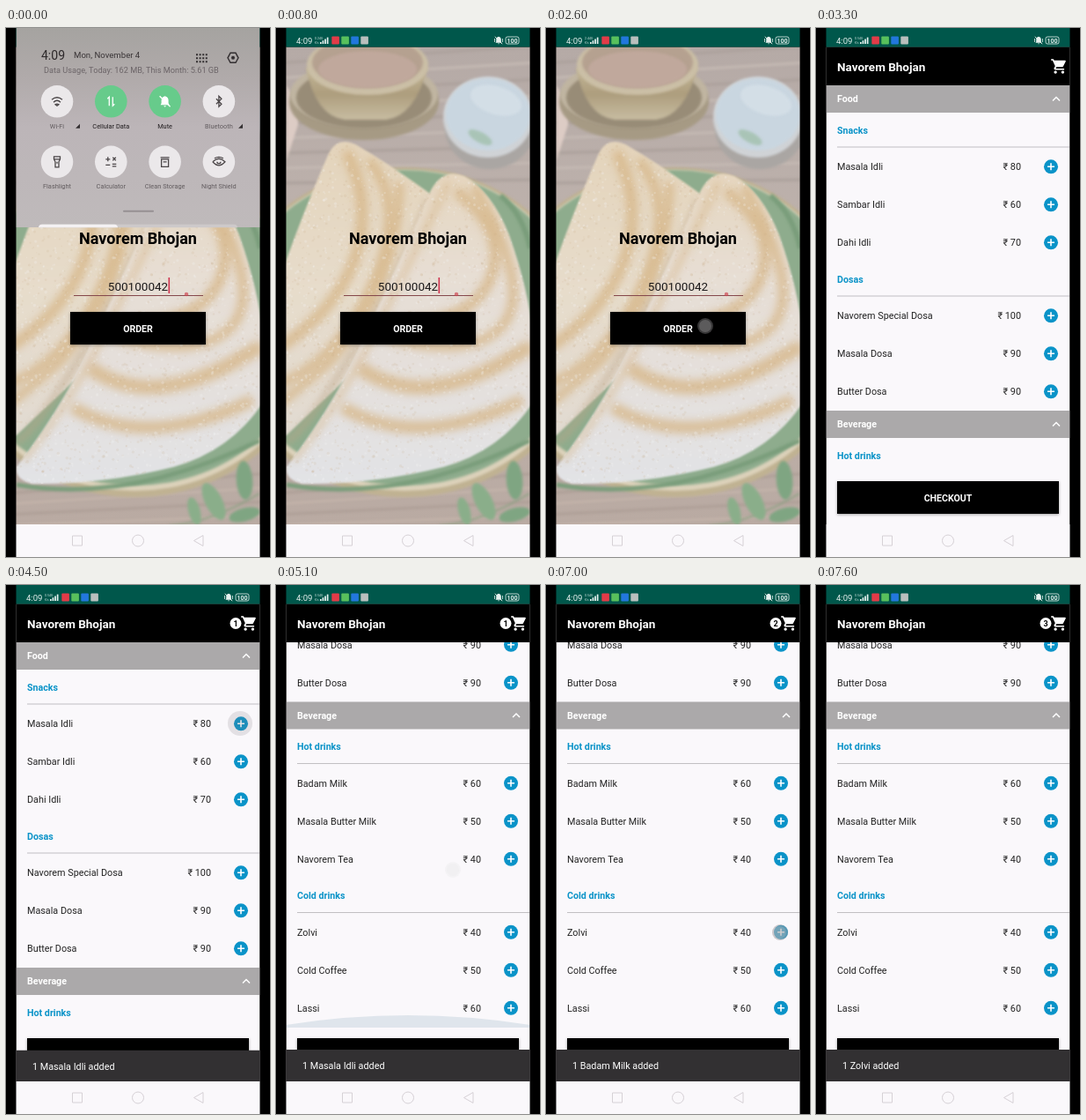
An HTML page with a canvas that plays this animation: 300x600 px, repeating every 8000 ms.

```html
<!DOCTYPE html>
<html>
<head>
<meta charset="utf-8">
<style>
  html, body { margin: 0; width: 100%; height: 100%; overflow: hidden; background: #000; }
  canvas { display: block; }
</style>
</head>
<body>
<canvas id="stage" width="300" height="600"></canvas>
<script>
const LOOP = 8000, LEFT = 11.5, WIDTH = 277, TOP = 21.5, SCROLL = 301.5;
const BLUE = '#0a93c8', PAPER = '#faf8fb', SHOP = 'Navorem Bhojan';
const MENU = [
  ['Food', [
    ['Snacks', [['Masala Idli', 80], ['Sambar Idli', 60], ['Dahi Idli', 70]]],
    ['Dosas', [['Navorem Special Dosa', 100], ['Masala Dosa', 90], ['Butter Dosa', 90]]]]],
  ['Beverage', [
    ['Hot drinks', [['Badam Milk', 60], ['Masala Butter Milk', 50], ['Navorem Tea', 40]]],
    ['Cold drinks', [['Zolvi', 40], ['Cold Coffee', 50], ['Lassi', 60]]]]]
];
const CART = new Path2D('M7 18a2 2 0 1 0 .01 0zM17 18a2 2 0 1 0 .01 0zM1 2v2h2l3.6 7.6-1.35 2.4C4.5 15.4 5.5 17 7 17h12v-2H7.4l1-1.9h7.5c.8 0 1.4-.4 1.7-1L21 5.5Q21.5 4 20 4H5.2l-.9-2z');

let ctx = document.getElementById('stage').getContext('2d');

const prog = (t, a, b) => Math.min(1, Math.max(0, (t - a) / (b - a)));
const ease = (t, a, b) => 1 - (1 - prog(t, a, b)) ** 3;

function rect(x, y, w, h, color, r = 0) {
  ctx.fillStyle = color;
  ctx.beginPath();
  ctx.roundRect(x, y, w, h, r);
  ctx.fill();
}
function oval(x, y, rx, ry, color, turn = 0) {
  ctx.fillStyle = color;
  ctx.beginPath();
  ctx.ellipse(x, y, rx, ry, turn, 0, 7);
  ctx.fill();
}
const disc = (x, y, r, color) => oval(x, y, r, r, color);
function line(d, color, width = 1) {
  ctx.strokeStyle = color;
  ctx.lineWidth = width;
  ctx.stroke(new Path2D(d));
}
function fill(d, color) {
  ctx.fillStyle = color;
  ctx.fill(new Path2D(d));
}
function text(s, x, y, size, color, weight = 400, align = 'left') {
  ctx.font = `${weight} ${size}px Roboto, sans-serif`;
  ctx.textAlign = align;
  ctx.fillStyle = color;
  ctx.fillText(s, x, y);
}
function clipped(x, y, w, h, draw) {
  ctx.save();
  ctx.beginPath();
  ctx.rect(x, y, w, h);
  ctx.clip();
  draw();
  ctx.restore();
}
function gradient(y0, y1, ...colors) {
  const g = ctx.createLinearGradient(0, y0, 0, y1);
  colors.forEach((c, i) => g.addColorStop(i / (colors.length - 1), c));
  return g;
}

function dosa(shape, base, bands, seed) {
  const next = () => (seed = seed * 16807 % 2147483647) / 2147483647;
  ctx.save();
  ctx.filter = 'blur(1px)';
  fill(shape, base);
  ctx.clip(new Path2D(shape));
  ctx.filter = 'blur(5px)';
  bands.forEach(([d, w]) => line(d, 'rgba(214,180,132,.75)', w));
  ctx.filter = 'none';
  for (let i = 0; i < 2600; i++) {
    disc(12 + next() * 276, 130 + next() * 390, .6 + next() * 1.2, i % 2 ? 'rgba(243,241,242,.25)' : 'rgba(190,155,115,.12)');
  }
  ctx.restore();
}

function makePhoto() {
  const canvas = document.createElement('canvas'), screen = ctx;
  canvas.width = 300;
  canvas.height = 600;
  ctx = canvas.getContext('2d');
  rect(0, 0, 300, 600, gradient(22, 563, '#b5aaa6', '#c0b4ae', '#b9aaa2'));
  ctx.filter = 'blur(1.5px)';
  for (let i = 0; i < 9; i++) line(`M0 ${40 + i * 17}L300 ${20 + i * 19}`, i % 2 ? '#c4b9b3' : '#aca19c', 3);
  for (let i = 0; i < 5; i++) line(`M0 ${528 + i * 12}L300 ${505 + i * 16}`, i % 2 ? '#c6b6ac' : '#aa9b93', 2);
  fill('M12 65Q28 90 25 110L12 150Z', '#ddccc5');
  // brass bowls
  oval(100, 84, 85, 43, '#a69a84');
  oval(100, 75, 84, 38, '#c0b5a1');
  oval(100, 79, 77, 35, '#988c77');
  fill('M34 45Q45 100 78 104H125Q158 100 172 45Z', gradient(45, 105, '#c3b798', '#ad9d7d', '#c8bda2'));
  oval(104, 42, 69, 34, '#cbbfa6');
  oval(104, 39, 63, 29, '#b5a190');
  oval(104, 47, 56, 21, '#c0a89c');
  // chutney
  oval(243, 113, 51, 47, '#aaa6a3');
  oval(241, 101, 51, 46, '#d0d3d6');
  oval(241, 98, 48, 41, '#c9d6e0');
  oval(250, 82, 30, 16, '#d3dee6', .3);
  oval(232, 124, 15, 6, '#a9c4b6', .5);
  // plate and leaf
  oval(146, 345, 208, 187, '#c0b292');
  oval(146, 343, 203, 182, '#dcd2bb');
  oval(146, 340, 199, 179, '#8eac8d');
  line('M12 518Q140 540 288 468', '#7a9d7b', 5);
  line('M255 190Q280 210 289 250', '#7a9d7b', 6);
  dosa('M0 296Q30 210 60 142Q70 122 92 133Q130 155 178 190L130 350L12 462H0Z',
    gradient(130, 460, '#e4d4bb', '#e7dccb', '#e2dbd2'), [
    ['M80 140Q110 200 90 260T0 365', 13],
    ['M105 150Q150 200 110 290T0 405', 11], ['M140 175Q140 290 60 380L0 430', 10]], 41);
  ctx.filter = 'blur(4px)';
  line('M174 195Q130 300 80 380T12 470', '#bda587', 4);
  ctx.filter = 'blur(1.5px)';
  dosa('M12 498Q75 415 105 340Q145 255 176 184Q190 158 214 168Q245 185 265 235Q288 300 292 350V425Q255 480 190 498Q110 518 30 517Q10 512 12 498Z',
    gradient(165, 515, '#e6d6bf', '#e7ded4', '#e5e0dc', '#e2e3e6'), [
    ['M196 175Q150 270 110 350T20 490', 5], ['M205 185Q262 230 245 280T150 335', 12],
    ['M225 180Q295 300 255 340T105 345', 11], ['M95 385Q170 440 290 360', 16],
    ['M75 430Q160 480 280 422', 14]], 97);
  // curry leaves
  line('M185 565Q235 560 288 528', '#8ea184', 2);
  [[236, 537, 23, 1.1], [271, 513, 22, 1.5], [214, 548, 16, 1.3], [271, 552, 18, -.25]]
    .forEach(([x, y, r, turn], i) => oval(x, y, r, r * .42, i % 2 ? '#7fa582' : '#8aae8a', turn));
  ctx = screen;
  return canvas;
}
const photo = makePhoto();

function statusBar(t) {
  rect(LEFT, 0, WIDTH, TOP, '#00574b');
  text('4:09', 23, 18, 9.5, '#e6f0ee');
  const rate = t < 900 ? '0.2' : t < 2000 ? '1.1' : t < 3300 ? '2.4' : '0.5';
  text(rate, 44, 13, 3.5, '#cfe0dc');
  text('K/s', 44, 17.5, 3, '#cfe0dc');
  text('4G', 49, 13, 3.5, '#cfe0dc');
  for (let i = 0; i < 4; i++) rect(50 + i * 2.6, 16 - i * 1.8, 1.7, 2 + i * 1.8, '#e6f0ee');
  ['#e23b48', '#58c05c', '#2277dd', '#b9bfbd'].forEach((c, i) => rect(63.3 + i * 11, 9.5, 8.6, 9, c, 1));
  bell(253, 14, .7, '#e6f0ee');
  line('M248.5 12v4M257.5 12v4', '#e6f0ee', .8);
  line('M263 10H274Q276 10 276 12V16Q276 18 274 18H263Q261 18 261 16V12Q261 10 263 10Z', '#e6f0ee', .8);
  text('100', 268.5, 16.8, 7, '#e6f0ee', 700, 'center');
}

function bell(x, y, scale, color) {
  ctx.save();
  ctx.translate(x, y);
  ctx.scale(scale, scale);
  fill('M-5 4L-4 2V-1Q-4 -5 0 -6Q4 -5 4 -1V2L5 4ZM-1.5 5H1.5L0 6.5Z', color);
  line('M-6 -6L6 6', color, 1.3);
  ctx.restore();
}

function navBar() {
  rect(LEFT, 563, WIDTH, 37, PAPER);
  line('M75.5 576H86.5V587H75.5ZM156.5 581.5A6.5 6.5 0 1 1 143.5 581.5A6.5 6.5 0 1 1 156.5 581.5M213.5 581.5L224 575.5V587.5Z', '#d6d1d6');
}

function button(label, x, y, w, h) {
  ctx.save();
  ctx.shadowColor = 'rgba(0,0,0,.35)';
  ctx.shadowBlur = 3;
  ctx.shadowOffsetY = 1;
  rect(x, y, w, h, '#000');
  ctx.restore();
  text(label, 150, y + h / 2 + 4, 10.6, '#fff', 700, 'center');
}

function home(t) {
  ctx.drawImage(photo, 0, 0);
  text(SHOP, 150, 245, 18, '#000', 700, 'center');
  text('500100042', 150, 298, 13.5, '#1c1a1b', 400, 'center');
  line('M77 303.5H224', '#85484c', 1.2);
  if ((t + 200) % 1000 < 500) rect(184.5, 283, 1.6, 18, '#d0344f');
  disc(205, 302, 2.3, 'rgba(205,70,80,.7)');
  button('ORDER', 73, 322, 154, 37);
}

function menuList(scroll) {
  let y = 65 - scroll;
  for (const [group, sections] of MENU) {
    rect(LEFT, y, WIDTH, 31, '#aba9aa');
    text(group, 24, y + 19.3, 10.7, '#fff', 700);
    line(`M269 ${y + 17.5}l4 -4l4 4`, '#fff', 1.5);
    y += 31;
    for (const [name, items] of sections) {
      text(name, 24, y + 23.5, 10.7, BLUE, 700);
      rect(24, y + 38.5, 264, 1, '#c2c0c3');
      y += 40;
      for (const [item, price] of items) {
        text(item, 24, y + 25.3, 10.8, '#222');
        text('₹ ' + price, 233, y + 25.3, 10.8, '#222', 400, 'right');
        disc(267, y + 21.3, 8, BLUE);
        line(`M263 ${y + 21.3}h8m-4 -4v8`, '#fff', 1.6);
        y += 43;
      }
    }
  }
}

function touch(x, y, t, from, to) {
  if (t < from || t >= to) return;
  ctx.globalAlpha = 1 - prog(t, to - 130, to) * .85;
  disc(x, y, 9, 'rgba(185,183,185,.3)');
  disc(x, y, 7, 'rgba(200,198,200,.25)');
  ctx.globalAlpha = 1;
}

function tap(y, t, from) {
  if (t < from || t >= from + 550) return;
  ctx.globalAlpha = 1 - prog(t, from + 300, from + 550);
  disc(266, y, 14 * ease(t, from - 60, from + 150), 'rgba(120,118,120,.3)');
  ctx.globalAlpha = 1;
  touch(266, y, t, from, from + 380);
}

function snackbar(t) {
  const shown = t < 6150 ? ease(t, 4250, 4600)
    : t < 6400 ? 1 - prog(t, 6150, 6400) ** 2
    : t < 7150 ? ease(t, 6400, 6700)
    : t < 7350 ? 1 - prog(t, 7150, 7350) ** 2
    : ease(t, 7350, 7600);
  const item = t < 6400 ? 'Masala Idli' : t < 7350 ? 'Badam Milk' : 'Zolvi';
  const y = 563 - 36 * shown;
  rect(LEFT, y, WIDTH, 36, '#323032');
  text(`1 ${item} added`, 30, y + 22.3, 10.8, '#fff');
}

function menu(t) {
  rect(LEFT, TOP, WIDTH, 563 - TOP, PAPER);
  clipped(LEFT, 65, WIDTH, 437, () => {
    menuList(SCROLL * ease(t, 4860, 5090));
    const glow = prog(t, 5000, 5080) * (1 - prog(t, 5120, 5600));
    if (glow) fill(`M11 502V499Q150 ${499 - 22 * glow} 289 499V502Z`, `rgba(70,120,145,${.15 * glow})`);
  });
  button('CHECKOUT', 24, 514, 252, 37);
  rect(LEFT, TOP, WIDTH, 65 - TOP, '#000');
  text(SHOP, 24, 48.5, 13.5, '#fff', 700);
  ctx.save();
  ctx.translate(266.3, 33.5);
  ctx.scale(.83, .83);
  ctx.fillStyle = '#fff';
  ctx.fill(CART);
  ctx.restore();
  const count = [4200, 6000, 7100].filter(at => t >= at).length;
  if (count) {
    disc(261, 43.5, 6.5, '#fff');
    text(count, 261, 46.8, 9, '#000', 700, 'center');
  }
  if (t >= 4250) snackbar(t);
  tap(157, t, 4100);
  touch(201, 470 - 147 * prog(t, 4860, 5080), t, 4880, 5120);
  tap(224, t, 5900);
  tap(394, t, 7000);
}

const ICONS = [
  'M-6 -2Q0 -7 6 -2M-4 1Q0 -3 4 1M-2 3.5Q0 2 2 3.5L0 5Z',
  'M-2 5V-5L-4 -3M2 -5V5L4 3',
  '',
  'M-3 -3L3 3L0 6V-6L3 -3L-3 3',
  'M-3.5 -6H3.5V-3L2 0V6H-2V0L-3.5 -3ZM-3.5 -3H3.5M0 0V2',
  'M-6 -3H-1M-3.5 -5.5V-.5M2 -5L5.5 -1.5M5.5 -5L2 -1.5M-6 3.5H-1M1.5 2.5H6M1.5 5H6',
  'M-5 -5H5M-4 -3H4V5.5H-4ZM-2 0H2',
  'M-7 0Q0 -7 7 0Q0 8 -7 0M-2 0A2 2 0 1 0 2 0M-5 -4Q0 -7 5 -4'
];
const LABELS = ['Wi-Fi', 'Cellular Data', 'Mute', 'Bluetooth', 'Flashlight', 'Calculator', 'Clean Storage', 'Night Shield'];

function quickSettings(t) {
  const lift = 228 * ease(t, 0, 400);
  if (lift >= 228) return;
  clipped(LEFT, 0, WIDTH, 228 - lift, () => {
    ctx.translate(0, -lift);
    rect(LEFT, 0, WIDTH, 228, gradient(0, 228, '#a5a3a0', '#b0aaaa', '#bcb5b8', '#bdb7b9', '#bfbabb'));
    text('4:09', 40, 37.5, 14, '#2d292b');
    text('Mon, November 4', 77, 36, 9.6, '#3b3638');
    text('Data Usage, Today: 162 MB, This Month: 5.61 GB', 43, 52.5, 9.2, '#6c6568');
    for (let i = 0; i < 12; i++) rect(216 + i % 4 * 3.6, 31 + (i >> 2) * 4, 2, 2, '#332f31');
    line('M255 30H261L264 35.5L261 41H255L252 35.5Z', '#332f31', 1.4);
    disc(258, 35.5, 2, '#332f31');
    LABELS.forEach((label, i) => {
      const x = 58 + i % 4 * 61.3, y = i < 4 ? 85 : 153.5, on = i == 1 || i == 2;
      disc(x, y, 18.3, on ? '#67cb8b' : '#ebe8ea');
      if (i == 2) bell(x, y, 1, '#fff');
      ctx.save();
      ctx.translate(x, y);
      line(ICONS[i], on ? '#fff' : '#4b4648', 1.3);
      ctx.restore();
      text(label, x, y + 30.5, 7.4, on ? '#1f1b1d' : '#625c5f', 400, 'center');
    });
    fill('M79 115.500H84V110.500ZM264 115.500H269V110.500Z', '#332f31');
    rect(133, 208.5, 35, 2, '#969093', 1);
    rect(37, 224.5, 226, 8, '#cdc9ca', 4);
    rect(37, 224.5, 90, 8, '#f4f1f3', 4);
  });
}

function draw(t) {
  rect(0, 0, 300, 600, '#000');
  const slide = ease(t, 2650, 3000);
  clipped(LEFT, TOP, WIDTH, 563 - TOP, () => {
    if (slide < 1) {
      ctx.save();
      ctx.translate(-60 * slide, 0);
      home(t);
      touch(181, 338, t, 2400, 2750);
      ctx.restore();
    }
    if (slide > 0) {
      ctx.translate(WIDTH * (1 - slide), 0);
      menu(t);
    }
  });
  statusBar(t);
  quickSettings(t);
  navBar();
}

function frame() {
  draw(performance.now() % LOOP);
  requestAnimationFrame(frame);
}
frame();
</script>
</body>
</html>
```
